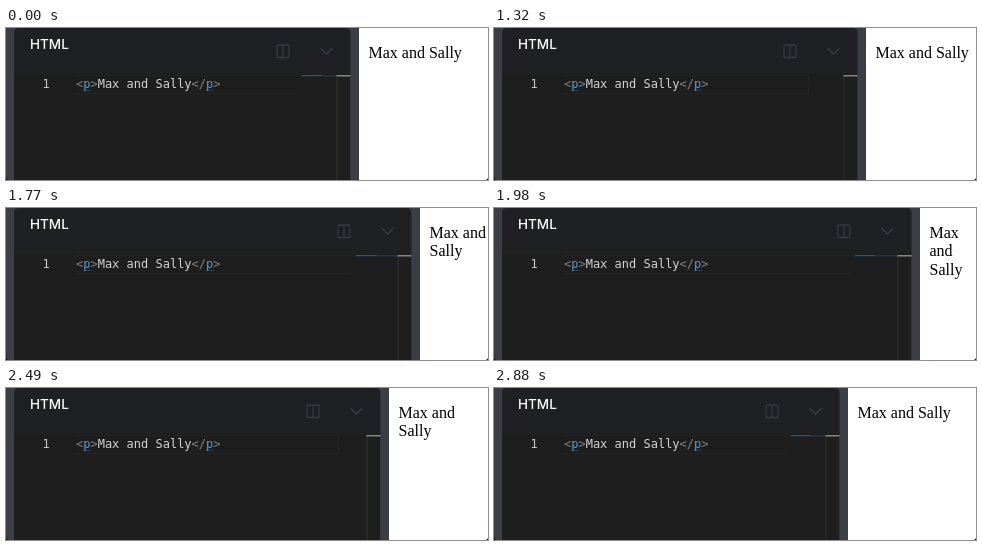
An HTML page with a canvas that plays this animation: 482 px wide and 152 px high, repeating every 3.78 s.

```html
<!DOCTYPE html>
<html lang="en">
<head>
<meta charset="utf-8">
<title>Resizing a preview pane</title>
<style>
html, body { margin: 0; width: 100%; height: 100%; overflow: hidden; background: #000; }
canvas { display: block; width: 482px; height: 152px; }
</style>
</head>
<body>
<canvas id="stage"></canvas>
<script>
const W = 482, H = 152, LOOP = 3780, STEP = 30;
const canvas = document.getElementById('stage');
const ctx = canvas.getContext('2d');
const ratio = window.devicePixelRatio || 1;
canvas.width = W * ratio;
canvas.height = H * ratio;

const MONO = '12px "DejaVu Sans Mono", monospace';
const SERIF = '16px "Liberation Serif", "Times New Roman", serif';
const TITLE = '500 13.5px Inter, sans-serif';
const words = ['Max', 'and', 'Sally'];

// [time, left edge of the preview]
const path = [
  [0, 352], [1140, 352], [1170, 353], [1200, 355], [1350, 375], [1530, 396],
  [1680, 404], [1770, 413], [1860, 413], [1890, 416], [1920, 420], [1950, 423],
  [1980, 425], [2280, 425], [2310, 423], [2400, 404], [2490, 382],
  [2610, 365], [2820, 354], [2880, 353], [LOOP, 353]
];

function edgeAt(t) {
  const i = path.findIndex(p => p[0] > t);
  const [t0, x0] = path[i - 1], [t1, x1] = path[i];
  return Math.round(x0 + (x1 - x0) * (t - t0) / (t1 - t0));
}

function rect(x, y, w, h, color) {
  ctx.fillStyle = color;
  ctx.fillRect(x, y, w, h);
}

function text(str, x, y, font, color) {
  ctx.font = font;
  ctx.fillStyle = color;
  ctx.fillText(str, x, y);
}

function stroke(points, color, width) {
  ctx.strokeStyle = color;
  ctx.lineWidth = width;
  ctx.beginPath();
  points.forEach(([x, y]) => ctx.lineTo(x, y));
  ctx.stroke();
}

function drawIcons(x) {
  ctx.strokeStyle = '#353940';
  ctx.lineWidth = 1.3;
  ctx.beginPath();
  ctx.roundRect(x - 81, 17, 12, 12.5, 1);
  ctx.stroke();
  stroke([[x - 75, 17], [x - 75, 29.5]], '#353940', 1.3);
  stroke([[x - 37.5, 20], [x - 31.5, 26], [x - 25.5, 20]], '#383c43', 1.4);
}

function drawCode() {
  rect(77, 62, 8, 1, '#263f54');
  rect(200, 62, 8, 1, '#263f54');
  text('1', 36.5, 60, MONO, '#c6c6c6');
  const parts = [
    ['<', '#808080'], ['p', '#569cd6'], ['>', '#808080'],
    [words.join(' '), '#d4d4d4'],
    ['</', '#808080'], ['p', '#569cd6'], ['>', '#808080']
  ];
  let x = 70;
  for (const [str, color] of parts) {
    text(str, x, 60, MONO, color);
    x += ctx.measureText(str).width;
  }
}

function drawEditor(x, t) {
  const right = x - 7.5;
  ctx.save();
  ctx.beginPath();
  ctx.roundRect(8, 0, right - 8, H + 8, 5);
  ctx.clip();
  rect(8, 0, right - 8, H, '#1e1e1e');
  rect(8, 0, right - 8, 46, '#1f2023');
  ctx.restore();

  const growing = t >= 1200 && t < 1710;
  const shrinking = t >= 2310 && t < 2850;
  const moving = growing || shrinking;
  const mapLeft = x - 57 - (x - 353) * 0.11;
  const lineEnd = growing ? x - 56 : shrinking ? x - 49 : mapLeft - 4;
  rect(70, 47, lineEnd - 70, 1, '#242424');
  rect(70, 65, lineEnd - 70, 1, '#242424');

  if (moving) {
    rect(lineEnd - 1, 47, 1, 19, '#242424');
  } else {
    rect(mapLeft, 47, x - 22 - mapLeft, 1.5, '#22364a');
    rect(mapLeft + 1, 47, 14, 1, '#46525c');
    rect(mapLeft + 15, 47, 6, 1, '#31557b');
  }
  rect(x - 21.5, 47, 1, H - 47, '#303030');
  rect(x - 21.5, 47, 14, 1.5, '#858585');

  text('HTML', 24, 21, TITLE, '#ffffff');
  drawIcons(x);
  drawCode();
}

function drawPreview(x) {
  rect(x + 1, 0, W - x, H, '#ffffff');
  const [a, b, c] = words;
  const lines = x > 415 ? words : x > 379 ? [a + ' ' + b, c] : [words.join(' ')];
  lines.forEach((line, i) => text(line, x + 10.5, 29.5 + i * 18.5, SERIF, '#000000'));
}

function draw(now) {
  const t = Math.floor((now % LOOP) / STEP) * STEP;
  const x = edgeAt(t);
  ctx.setTransform(ratio, 0, 0, ratio, 0, 0);
  ctx.clearRect(0, 0, W, H);
  ctx.save();
  ctx.beginPath();
  ctx.roundRect(0, 0, W, H, [0, 0, 3, 3]);
  ctx.clip();
  rect(0, 0, W, H, '#3b3e45');
  drawEditor(x, t);
  drawPreview(x);
  ctx.restore();
}

let start;
function tick(now) {
  start ??= now;
  draw(Math.max(0, now - start));
  requestAnimationFrame(tick);
}
draw(0);
requestAnimationFrame(tick);
</script>
</body>
</html>
```
